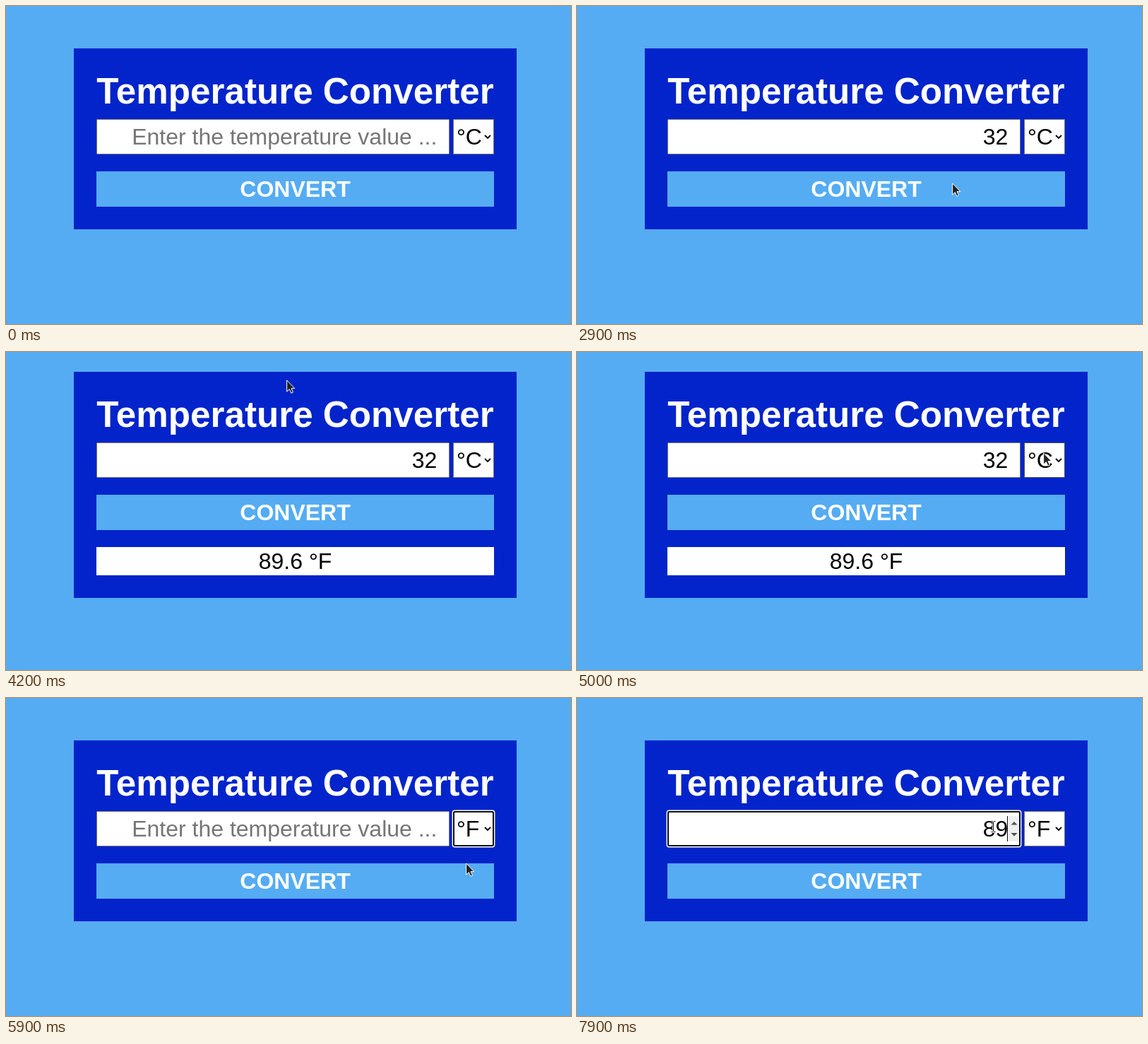
These frames come from a looping animation (800x450 px, 8000 ms). An HTML page:

```html
<!DOCTYPE html>
<html lang="en">
<head>
<meta charset="utf-8">
<title>Temperature Converter</title>
<style>
  html, body { margin: 0; width: 100%; height: 100%; overflow: hidden; background: #55acf3; }
  svg { display: block; width: 800px; height: 450px; }
  text { font: 32px "Liberation Sans", Arial, sans-serif; }
  .bold { font-weight: bold; fill: #fff; text-anchor: middle; }
  .end { text-anchor: end; }
</style>
</head>
<body>
<svg viewBox="0 0 800 450">
  <defs>
    <filter id="blur" x="-50%" y="-50%" width="200%" height="200%">
      <feGaussianBlur stdDeviation="3"/>
    </filter>
  </defs>
  <rect width="800" height="450" fill="#55acf3"/>
  <g id="panel">
    <rect id="back" x="96" y="60" width="627" height="256" fill="#0224ca"/>
    <text class="bold" x="409.5" y="138" style="font-size:51.2px">Temperature Converter</text>

    <rect id="field" x="128.5" y="160.5" width="499" height="49" rx="1" fill="#fff" stroke="#767676"/>
    <g id="fieldRing" fill="none">
      <rect x="127.3" y="159.3" width="501.4" height="51.4" rx="3" stroke="#fff" stroke-width="1.4"/>
      <rect x="129" y="161" width="498" height="48" rx="2" stroke="#101010" stroke-width="2"/>
    </g>
    <g id="spinner">
      <rect x="611" y="167" width="15" height="36" fill="#efefef"/>
      <path d="M614.5 179.5l4.5-4.5l4.5 4.5zM614.5 191l4.5 4.5l4.5-4.5z" fill="#505050"/>
    </g>
    <text id="hint" class="end" x="610.4" y="196" fill="#757575">Enter the temperature value ...</text>
    <text id="value" class="end" x="610.4" y="196"></text>
    <rect id="caret" y="167" width="1" height="36"/>

    <rect id="select" x="633.5" y="160.5" width="57" height="49" fill="#fff" stroke="#767676"/>
    <g id="selectRing" fill="none">
      <rect x="632.3" y="159.3" width="59.4" height="51.4" rx="3" stroke="#fff" stroke-width="1.4"/>
      <rect x="634" y="161" width="56" height="48" rx="2" stroke="#101010" stroke-width="2"/>
    </g>
    <text id="unit" x="638" y="196"></text>
    <path d="M678 183l4 4l4-4" fill="none" stroke="#000" stroke-width="1.8"/>

    <rect x="128" y="234" width="563" height="50" fill="#55acf3"/>
    <text class="bold" x="409.5" y="270">CONVERT</text>

    <g id="result">
      <rect x="128" y="308" width="563" height="40" fill="#fff"/>
      <text x="409.5" y="339" text-anchor="middle">89.6 °F</text>
    </g>

    <g id="popup">
      <rect x="633" y="212" width="58" height="79" opacity=".4" filter="url(#blur)"/>
      <rect x="633.5" y="210.5" width="57" height="80" fill="#fff" stroke="#767676"/>
      <rect id="itemC" x="634" y="211" width="56" height="39"/>
      <rect id="itemF" x="634" y="250" width="56" height="40"/>
      <text id="textC" x="638" y="240">°C</text>
      <text id="textF" x="638" y="280">°F</text>
    </g>
  </g>
  <path id="arrow" d="M.6 .9V17l3.7-3.4l2.5 5.6l2.7-1.2l-2.5-5.4h4.8z"
        fill="#222" stroke="#fff" stroke-linejoin="round"/>
  <g id="beam" fill="none">
    <path d="M-3 -7.5h2l1 1l1-1h2M0-6.5v13M-3 7.5h2l1-1l1 1h2" stroke="#fff" stroke-width="2.6"/>
    <path d="M-3 -7.5h2l1 1l1-1h2M0-6.5v13M-3 7.5h2l1-1l1 1h2" stroke="#111"/>
  </g>
</svg>
<script>
const LOOP = 8000, STEP = 100;
const el = {};
document.querySelectorAll('[id]').forEach(e => el[e.id] = e);

// Pointer stops: time, x, y
const stops = [
  [600, 620, 73], [1300, 537.5, 167],
  [2400, 537.5, 167], [2800, 531, 250],
  [3200, 531, 250], [3800, 425, 142],
  [4100, 425, 142], [4200, 397, 39], [4300, 401, 31], [5000, 660, 142],
  [5400, 660, 142], [5600, 651, 233],
  [6000, 651, 233], [6700, 589.5, 182], [8000, 589.5, 182]
];

const within = (t, a, b) => t >= a && t < b;
const show = (e, on) => e.setAttribute('visibility', on ? 'visible' : 'hidden');
const set = (e, name, v) => e.setAttribute(name, v);
const inside = (p, x, y, w, h) => within(p.x, x, x + w) && within(p.y, y, y + h);

function pointer(t) {
  const i = Math.max(0, stops.findIndex(s => s[0] > t) - 1);
  const [t0, x0, y0] = stops[i], [t1, x1, y1] = stops[i + 1];
  const u = Math.min(1, Math.max(0, (t - t0) / (t1 - t0)));
  const k = u * u * (3 - 2 * u);
  return { x: x0 + (x1 - x0) * k, y: y0 + (y1 - y0) * k };
}

function typed(t) {
  if (within(t, 2200, 2400)) return '3';
  if (within(t, 2400, 5900)) return '32';
  if (within(t, 7600, 7900)) return '8';
  return t >= 7900 ? '89' : '';
}

function draw(t) {
  const done = within(t, 3000, 5900), lift = done ? -32 : 0;
  const open = within(t, 5100, 5900);
  const p = pointer(t), local = { x: p.x, y: p.y - lift };
  const focus = within(t, 1300, 2900) || t >= 6700;
  const overField = t >= 600 && inside(local, 128, 160, 500, 50);
  const overSelect = inside(local, 633, 160, 58, 50) && !open;
  const overTitle = inside(local, 128, 92, 563, 59);
  const text = typed(t);

  set(el.panel, 'transform', `translate(0 ${lift})`);
  set(el.back, 'height', done ? 320 : 256);
  show(el.result, done);

  set(el.field, 'stroke', overField ? '#4f4f4f' : '#767676');
  set(el.select, 'stroke', overSelect ? '#4f4f4f' : '#767676');
  show(el.fieldRing, focus);
  show(el.spinner, focus || overField);
  show(el.hint, !text);
  el.value.textContent = text;
  set(el.caret, 'x', text ? 609 : 610);
  show(el.caret, focus && !within(t, 2000, 2200) && !within(t, 7300, 7600));

  el.unit.textContent = t < 5900 ? '°C' : '°F';
  show(el.selectRing, within(t, 5900, 6700));

  show(el.popup, open);
  const onF = t >= 5600;
  set(el.itemC, 'fill', onF ? '#efefef' : '#478af8');
  set(el.itemF, 'fill', onF ? '#478af8' : '#fff');
  set(el.textC, 'fill', onF ? '#000' : '#fff');
  set(el.textF, 'fill', onF ? '#fff' : '#000');

  const beam = overField || overTitle;
  show(el.arrow, t >= 600 && !beam);
  show(el.beam, t >= 600 && beam);
  set(beam ? el.beam : el.arrow, 'transform', `translate(${Math.round(p.x * 2) / 2} ${Math.round(p.y)})`);
}

const start = performance.now();
function tick() {
  const t = (performance.now() - start) % LOOP;
  draw(Math.floor(t / STEP) * STEP);
  requestAnimationFrame(tick);
}
draw(0);
requestAnimationFrame(tick);
</script>
</body>
</html>
```
